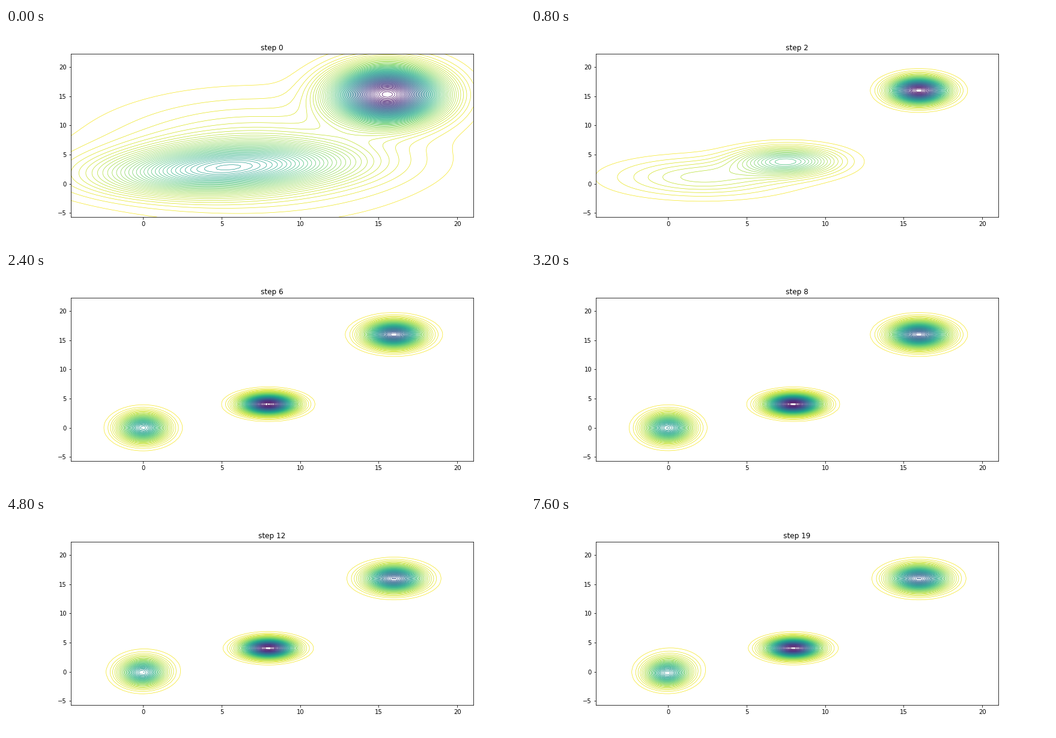
Animation of 864x360 px, one loop 8 s. Source, as a matplotlib script:

```python
import matplotlib.pyplot as plt
import numpy as np
from matplotlib.animation import FuncAnimation

STEPS = 20
X_RANGE = (-4.60, 21.01)
Y_RANGE = (-5.69, 22.27)
X, Y = np.meshgrid(np.linspace(*X_RANGE, 100), np.linspace(*Y_RANGE, 100))


def gaussian(weight, mx, my, sx, sy):
    z = ((X - mx) / sx) ** 2 + ((Y - my) / sy) ** 2
    return weight * np.exp(-z / 2) / (2 * np.pi * sx * sy)


def power_decay(step, duration, power):
    return max(0, 1 - (step / duration) ** power)


def cosine_decay(step, duration):
    return (1 + np.cos(np.pi * min(step / duration, 1))) / 2


def blend(rest, start, amount):
    """Move linearly from start (amount 1) to rest (amount 0)."""
    return rest + (start - rest) * amount


def blend_width(rest, start, amount):
    """Like blend, but widths shrink geometrically."""
    return rest * (start / rest) ** amount


def upper_cluster(step):
    far = cosine_decay(step, 2)
    return gaussian(blend(0.396, 0.405, far),
                    blend(15.97, 15.55, far), blend(16.0, 15.35, far),
                    blend_width(1.09, 2.1, far), blend_width(1.33, 2.95, far))


def middle_cluster(step, rest_width):
    far = cosine_decay(step, 4)
    return gaussian(blend(0.37, 0.17, far),
                    blend(7.97, 7.2, far), blend(4.05, 3.7, far),
                    blend_width(rest_width, 4.2, far),
                    blend_width(rest_width, 2.4, far))


def lower_cluster(step, weight, wide, drift):
    """Two overlapping components that slowly drift apart about a shared centre."""
    far = power_decay(step, 4.1, 2)
    mx, my = blend(0, 2.9, far), blend(0, 1.5, far)
    sx, sy = blend_width(0.928, 4.0, wide), blend_width(1.475, 2.4, far)
    total = 0
    for share, side in ((2 / 3, -1), (1 / 3, 2)):
        scale = 1 + 0.12 * drift * np.sign(side)
        total = total + gaussian(share * weight,
                                 mx + 0.085 * side * drift, my + 0.35 * side * drift,
                                 sx * scale, sy * scale)
    return total


def mixture(step):
    background = 0.24 * power_decay(step, 2, 1)
    wide = power_decay(step, 4.6, 3)
    drift = np.sin(np.pi / 2 * np.clip((step - 6) / 12, 0, 1))
    return (gaussian(background, 7.2, 5.0, 6, 6)
            + lower_cluster(step, 0.247 - 0.4 * background, wide, drift)
            + middle_cluster(step, 1.016 - 0.02 * max(wide, drift))
            + upper_cluster(step))


def draw(step):
    ax.clear()
    ax.contour(X, Y, mixture(step), 70, cmap="viridis_r", linewidths=0.7)
    ax.set(xlim=X_RANGE, ylim=Y_RANGE, title=f"step {step}")


fig, ax = plt.subplots(figsize=(12, 5), dpi=72)
fig.subplots_adjust(left=0.125, right=0.9, bottom=0.125, top=0.88)

anim = FuncAnimation(fig, draw, frames=STEPS, init_func=lambda: None,
                     interval=400, repeat=True, repeat_delay=0)
plt.show()
```
